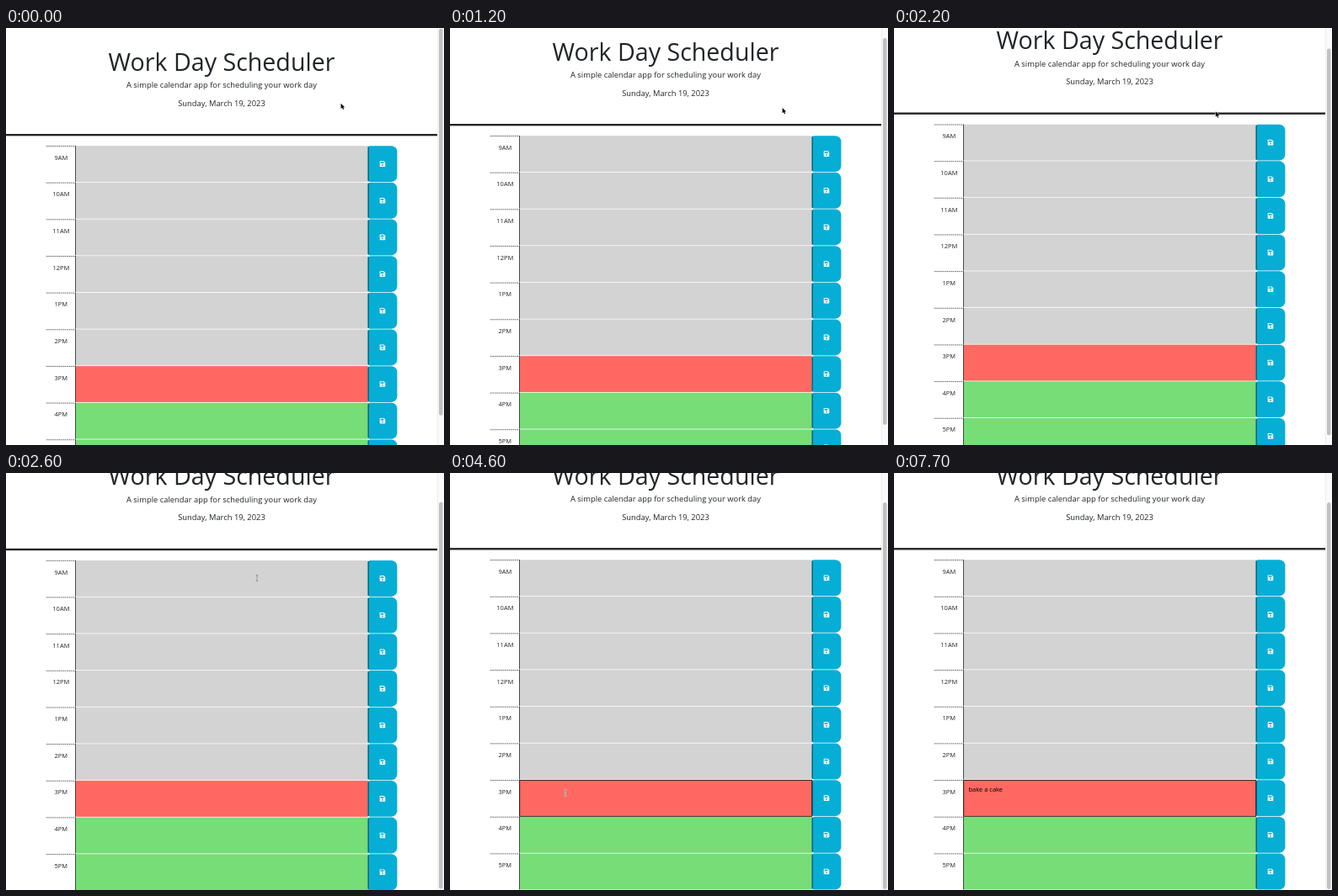
An HTML page with a canvas that plays this animation: 520 px wide and 496 px high, repeating every 8000 ms.

```html
<!DOCTYPE html>
<html lang="en">
<head>
<meta charset="utf-8">
<title>Work Day Scheduler</title>
<style>
  html, body { margin: 0; width: 100%; height: 100%; overflow: hidden; background: #fff; }
  canvas { display: block; width: 520px; height: 496px; }
</style>
</head>
<body>
<canvas id="stage"></canvas>
<script>
const W = 520, H = 496, LOOP = 8000;
const PAGE_W = 512, LEFT = 48, COL = 34.7;
const ROWS_TOP = 140.2, PITCH = 43.66, ROW_H = 42.9;
const BOX_X = LEFT + COL, BOX_W = COL * 10, BTN_X = BOX_X + BOX_W;
const INK = '#212529', BLUE = '#06aed5';
const PAST = '#d3d3d3', NOW = '#ff6961', NEXT = '#77dd77';
const HOURS = ['9AM', '10AM', '11AM', '12PM', '1PM', '2PM', '3PM', '4PM', '5PM'];
const ACTIVE = 6;

// [time, value] pairs; each value holds until the next one
const SCROLL = [[0, 0], [700, 1], [800, 3.5], [900, 6], [1200, 12], [1400, 18], [1900, 23.5],
  [2200, 25.5], [2300, 28.5], [2400, 31.5], [2500, 34.3], [2600, 36.2], [2700, 36.9]];
const TYPED = [[0, ''], [5500, 'b'], [5600, 'ba'], [5800, 'bak'], [5900, 'bake'], [6100, 'bake '],
  [6300, 'bake a'], [6500, 'bake a '], [6700, 'bake a c'], [6800, 'bake a ca'],
  [7000, 'bake a cak'], [7100, 'bake a cake']];
const CARET = [[0, false], [4000, true], [4600, false], [5100, true], [7700, false]];
const POINTER = [[0, [397.6, 89.8]], [300, [395.2, 93]], [1200, [394.6, 95]],
  [1600, [392.6, 96]], [1700, [391.6, 96.4]]];

const canvas = document.getElementById('stage');
const ctx = canvas.getContext('2d');
const dpr = window.devicePixelRatio || 1;
canvas.width = W * dpr;
canvas.height = H * dpr;

const hold = (keys, t) => keys.reduce((v, [at, value]) => t >= at ? value : v, keys[0][1]);
const clamp = v => Math.max(0, Math.min(1, v));
const smooth = v => v * v * (3 - 2 * v);
const mix = (a, b, k) => a.map((v, i) => v + (b[i] - v) * k);

function rect(x, y, w, h, color) {
  ctx.fillStyle = color;
  ctx.fillRect(x, y, w, h);
}

function text(str, x, y, size, align = 'center', color = INK) {
  ctx.font = `${size}px "Open Sans", sans-serif`;
  ctx.textAlign = align;
  ctx.fillStyle = color;
  ctx.fillText(str, x, y);
}

function polygon(points, x, y) {
  ctx.beginPath();
  points.forEach(([px, py]) => ctx.lineTo(x + px, y + py));
  ctx.closePath();
}

function saveIcon(x, y) {
  polygon([[0.4, 0], [4.9, 0], [6.6, 1.7], [6.6, 6.2], [6.2, 6.6], [0.4, 6.6], [0, 6.2], [0, 0.4]], x, y);
  ctx.fillStyle = '#fff';
  ctx.fill();
  rect(x + 0.95, y + 0.95, 3.8, 1.85, BLUE);
  ctx.beginPath();
  ctx.arc(x + 3.3, y + 4.65, 0.95, 0, Math.PI * 2);
  ctx.fill();
}

function drawRow(hour, i) {
  const y = ROWS_TOP + i * PITCH;
  ctx.strokeStyle = '#000';
  ctx.lineWidth = 0.7;
  ctx.setLineDash([1.4, 1]);
  ctx.beginPath();
  ctx.moveTo(LEFT, y + 0.3);
  ctx.lineTo(BOX_X, y + 0.3);
  ctx.stroke();
  ctx.setLineDash([]);
  text(hour, LEFT + COL / 2, y + 16.5, 7.5);

  rect(BOX_X, y, BOX_W, ROW_H, i < ACTIVE ? PAST : i === ACTIVE ? NOW : NEXT);
  rect(BOX_X - 0.4, y, 0.7, ROW_H, '#000');

  ctx.beginPath();
  ctx.roundRect(BTN_X, y, COL, ROW_H, [2.5, 7, 7, 2.5]);
  ctx.fillStyle = BLUE;
  ctx.fill();
  rect(BTN_X, y + 1, 0.7, ROW_H - 2, '#000');
  saveIcon(443.7, y + 18.1);
}

function drawEntry(t) {
  const y = ROWS_TOP + ACTIVE * PITCH;
  const focus = clamp((t - 3850) / 200);
  if (focus > 0) {
    ctx.globalAlpha = focus;
    ctx.strokeStyle = '#222';
    ctx.lineWidth = 0.9;
    ctx.strokeRect(BOX_X, y + 0.2, BOX_W, ROW_H);
    ctx.globalAlpha = 1;
  }
  const typed = hold(TYPED, t), x = BOX_X + 5.8;
  text(typed, x, y + 13.5, 7.5, 'left', '#000');
  if (hold(CARET, t)) rect(x + ctx.measureText(typed).width, y + 5.2, 0.7, 10.2, '#000');
}

function drawPage(t, scroll) {
  ctx.save();
  ctx.translate(0, -scroll);
  text('Work Day Scheduler', PAGE_W / 2, 50.5, 28.6);
  text('A simple calendar app for scheduling your work day', PAGE_W / 2, 71, 9.4);
  text('Sunday, March 19, 2023', PAGE_W / 2, 92.6, 9.4);
  rect(0, 126, PAGE_W, 2.35, '#222');
  HOURS.forEach(drawRow);
  drawEntry(t);
  ctx.restore();
}

function drawScrollbar(scroll) {
  rect(PAGE_W, 0, W - PAGE_W, H, '#fafafa');
  rect(PAGE_W, 0, 0.6, H, '#e6e6e6');
  ctx.beginPath();
  ctx.roundRect(514, 0.8 + scroll * 0.93, 4.6, 460, 2.3);
  ctx.fillStyle = '#c1c1c1';
  ctx.fill();
}

function arrow([x, y]) {
  polygon([[0, 0], [0, 6.3], [1.5, 5], [2.5, 7.3], [3.6, 6.8], [2.6, 4.6], [4.6, 4.5]], x, y);
  ctx.strokeStyle = '#fff';
  ctx.lineWidth = 0.9;
  ctx.stroke();
  ctx.fillStyle = '#000';
  ctx.fill();
}

function beam([x, y]) {
  ctx.beginPath();
  for (const side of [-1, 1]) {
    ctx.moveTo(x - 1.4, y + side * 3.6);
    ctx.lineTo(x, y + side * 3);
    ctx.lineTo(x + 1.4, y + side * 3.6);
  }
  ctx.moveTo(x, y - 3);
  ctx.lineTo(x, y + 3);
  for (const [width, color] of [[1.6, '#fff'], [0.7, '#444']]) {
    ctx.lineWidth = width;
    ctx.strokeStyle = color;
    ctx.stroke();
  }
}

function drawPointer(t, scroll) {
  if (t >= 6400) return;
  const over = [298, 125], rest = [137, 380.6];
  if (t < 2200) return arrow(hold(POINTER, t));
  const pos = t < 2800
    ? mix([391.6, 96.4], over, smooth(clamp((t - 2100) / 500)))
    : mix(over, rest, smooth(clamp((t - 2800) / 900)));
  if (pos[1] > ROWS_TOP - scroll) beam(pos);
  else arrow(pos);
}

function draw(now) {
  const t = Math.floor((now % LOOP) / 100) * 100;
  const scroll = hold(SCROLL, t);
  ctx.setTransform(dpr, 0, 0, dpr, 0, 0);
  rect(0, 0, W, H, '#fff');
  drawPage(t, scroll);
  drawScrollbar(scroll);
  drawPointer(t, scroll);
}

const start = performance.now();
function tick() {
  draw(performance.now() - start);
  requestAnimationFrame(tick);
}
tick();
</script>
</body>
</html>
```
